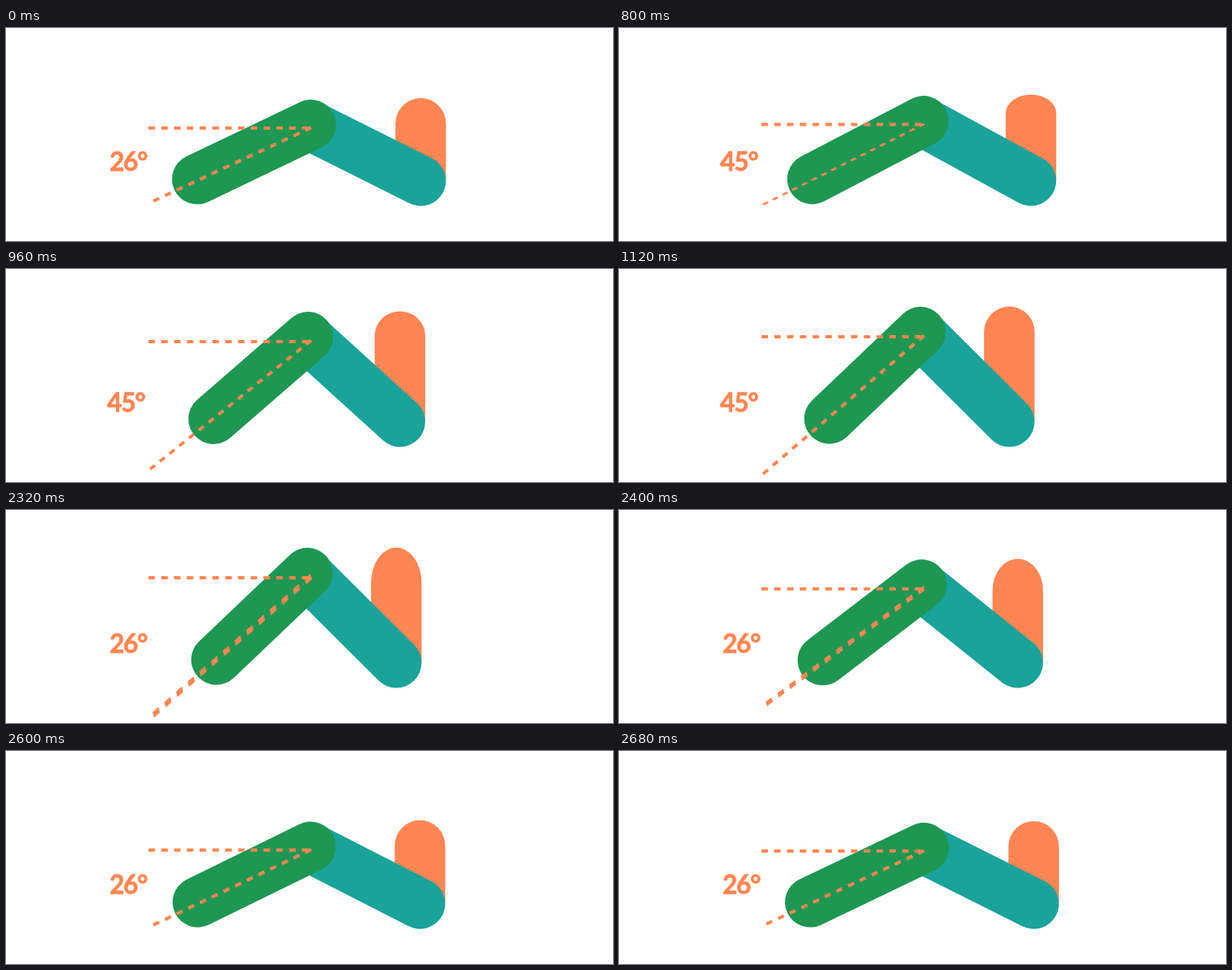
Animation, 750 px wide and 264 px high, one loop 4120 ms. Source, as an HTML page with a canvas:

```html
<!DOCTYPE html>
<html lang="en">
<head>
<meta charset="utf-8">
<title>Angle change</title>
<style>
  html, body { margin: 0; width: 100%; height: 100%; overflow: hidden; background: #fff; }
  canvas { display: block; width: 750px; height: 264px; }
</style>
</head>
<body>
<canvas id="stage" width="750" height="264"></canvas>
<script>
const ctx = document.getElementById('stage').getContext('2d');
const LOOP = 4120, STEP = 40, MOVE = 360;
const GREEN = '#1d9752', TEAL = '#19a39a', ORANGE = '#ff8652';
const R = 31.2;

const mix = (a, b, p) => a + (b - a) * p;

// cubic-bezier(.25, .1, .25, 1)
function ease(x) {
  if (x <= 0) return 0;
  if (x >= 1) return 1;
  const curve = (a, b, u) => 3 * a * u * (1 - u) ** 2 + 3 * b * u * u * (1 - u) + u ** 3;
  let lo = 0, hi = 1;
  for (let i = 0; i < 30; i++) {
    const mid = (lo + hi) / 2;
    if (curve(.25, .25, mid) < x) lo = mid; else hi = mid;
  }
  return curve(.1, 1, lo);
}

function line(x1, y1, x2, y2, color, width, cap, dash = []) {
  ctx.strokeStyle = color;
  ctx.lineWidth = width;
  ctx.lineCap = cap;
  ctx.setLineDash(dash);
  ctx.beginPath();
  ctx.moveTo(x1, y1);
  ctx.lineTo(x2, y2);
  ctx.stroke();
}

const bar = (x1, y1, x2, y2, color) => line(x1, y1, x2, y2, color, 2 * R, 'round');

// Upright post; its cap is squashed or stretched along with its height
function post(x, top, steep) {
  const base = 189.3;
  const ry = R * (base - top) / (base - (steep ? 46.6 : 87));
  ctx.fillStyle = ORANGE;
  ctx.beginPath();
  ctx.ellipse(x, top + ry, R, ry, 0, Math.PI, 2 * Math.PI);
  ctx.lineTo(x + R, base);
  ctx.lineTo(x - R, base);
  ctx.fill();
}

// Slanted ray, scaled vertically as a whole so its stroke changes weight
function ray(p, steep) {
  const left = steep ? 178 : 182, gap = steep ? 7.92 : 7.94;
  const top = steep ? 82.5 : 123.5, bottom = steep ? 254 : 214.5;
  const y1 = mix(123.5, 82.5, p), y2 = mix(214.5, 254, p);
  const k = (y2 - y1) / (bottom - top);
  ctx.save();
  ctx.translate(0, y1);
  ctx.scale(1, k);
  line(left, bottom - top, 377, 0, ORANGE, 4, 'butt', [8, gap]);
  ctx.restore();
}

function label(text, x, spacing) {
  ctx.font = '700 31.5px Lato, sans-serif';
  ctx.letterSpacing = spacing + 'px';
  ctx.textBaseline = 'alphabetic';
  ctx.fillStyle = ctx.strokeStyle = ORANGE;
  ctx.lineWidth = 0.8;
  ctx.lineJoin = 'round';
  ctx.setLineDash([]);
  ctx.fillText(text, x, 176.5);
  ctx.strokeText(text, x, 176.5);
}

function draw(t) {
  t = Math.floor(t / STEP) * STEP;
  const steep = t >= 800 && t < 2320;
  let p = 0;
  if (steep) p = ease((t - 760) / MOVE);
  else if (t >= 2320) p = 1 - ease((t - 2320) / MOVE);

  ctx.fillStyle = '#fff';
  ctx.fillRect(0, 0, 750, 264);

  const x = mix(376.5, 372.5, p), footX = mix(512.4, 482.3, p);
  post(footX, mix(87, 46.6, p), steep);
  bar(x, mix(121.2, 79.5, p), footX, 189.3, TEAL);
  bar(x, mix(120, 78, p), mix(236.3, 260, p), mix(187.4, 185.5, p), GREEN);

  const y = mix(124, 84, p);
  line(176, y, 376.5, y, ORANGE, 4, 'butt', [8, 7.8]);
  ray(p, steep);

  if (steep) label('45°', 125, -1);
  else label('26°', 128, -1.2);
}

function tick() {
  draw(performance.now() % LOOP);
  requestAnimationFrame(tick);
}
tick();
</script>
</body>
</html>
```
